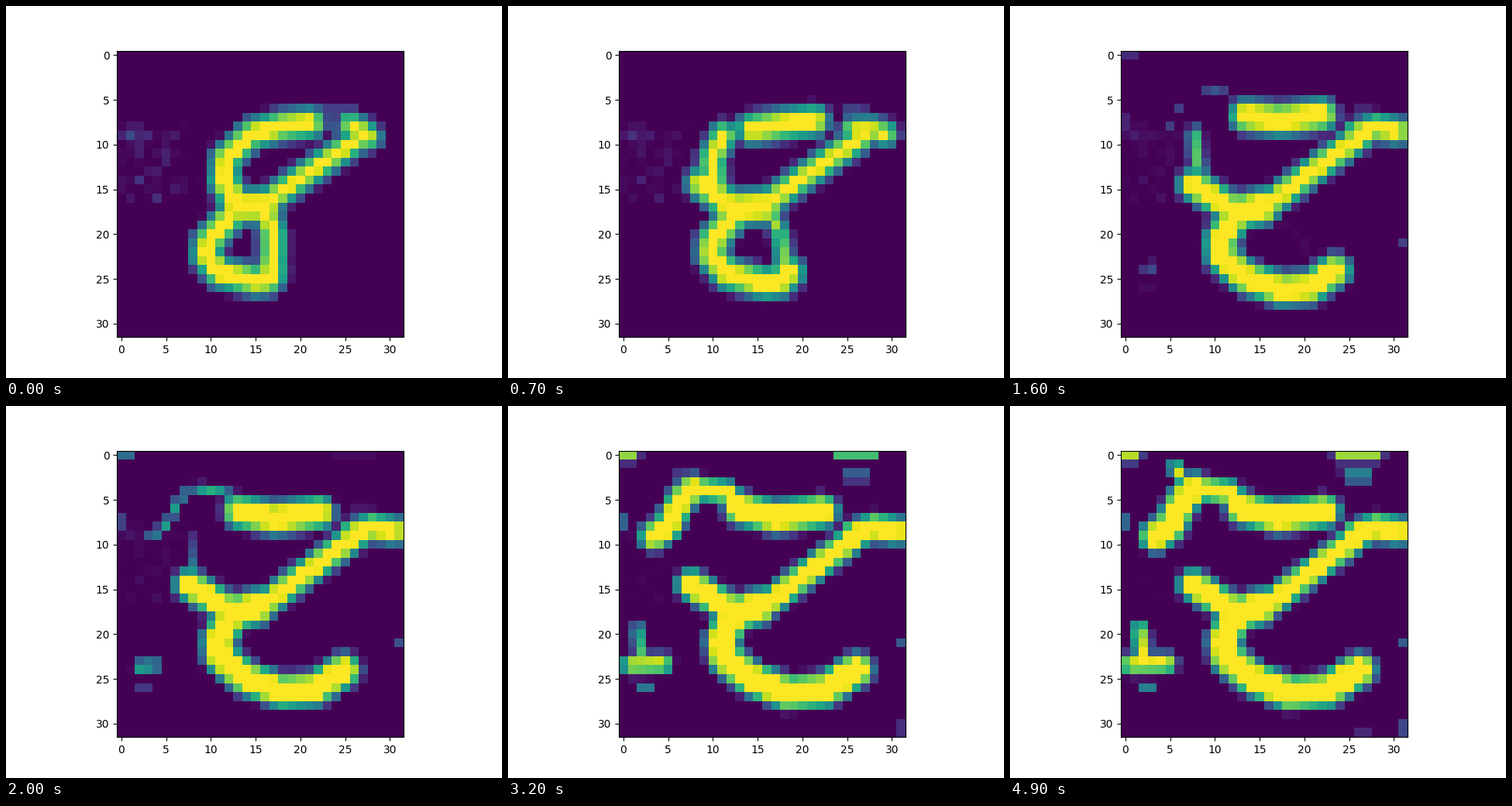
Animation, 640 px wide and 480 px high, one loop 5 s. Source, as a matplotlib script:

```python
import numpy as np
import matplotlib.pyplot as plt
from matplotlib.animation import FuncAnimation

SIZE = 32
FRAMES = 50
INTERVAL = 100
HIDDEN = -1.2  # radius at which a stroke leaves no trace

rows, cols = np.mgrid[0:SIZE, 0:SIZE].astype(float)
strokes = []


def ease(frame, centre, pace=4.2):
    """S-curve from 0 to 1 that is half way at the centre frame."""
    return 1 / (1 + np.exp((centre - frame) / pace))


def stroke(start, end, radii, move=12, grow=12):
    """A line bending from start to end while its radius changes."""
    strokes.append((np.array(start, float), np.array(end, float), radii, move, grow))


def appear(points, radius, grow):
    """A line that stays in place and swells into view."""
    stroke(points, points, (HIDDEN, radius), grow=grow)


# Top bar, left arc of the upper loop, lower arm of that arc
stroke([(21, 7.7), (18, 8), (14.8, 9)],
       [(22.2, 6.3), (17, 7), (13, 6)], (1.5, 1.75))
stroke([(14.8, 9.2), (12, 11.6), (11.7, 14.2)],
       [(7.5, 8.8), (7.8, 11.5), (8.4, 14)], (1.5, HIDDEN), move=7, grow=18)
stroke([(11.8, 14), (13, 16.6)], [(7.6, 14.5), (12, 17.3)], (1.55, 1.6), move=5)

# Crossing, diagonal, hook at its top and the faint link back to the bar
stroke([(13, 16.9), (16, 16.9)], [(12.3, 17.8), (15, 17)], (1.8, 1.9))
stroke([(16.5, 16.2), (26.8, 9.2)], [(16.5, 16.3), (26, 9.1)], (1.3, 1.4))
stroke([(25.5, 7.6), (27, 8.6), (27.5, 9.3)],
       [(25.8, 8.9), (28, 8.1), (30.4, 8.5)], (1.1, 1.45), move=6)
stroke([(22, 6.4), (26, 6.4)], [(25.5, 6.3), (27, 6.3)], (-0.2, -0.4), move=5)

# Lower left curve running into the bottom, and the side that dissolves
stroke([(12.2, 18), (9.7, 20.8), (9.4, 22.4), (10.8, 24.3), (15, 25.2), (16, 25), (16.2, 24.4)],
       [(12, 18.5), (11, 20.7), (11.3, 22.6), (14.3, 25), (18.3, 26.6), (22.5, 26.3), (26.1, 24)],
       (1.5, 1.8))
stroke([(16, 17), (16.7, 20), (16.6, 22.5), (16.1, 24.6)],
       [(17, 17.8), (20, 19.5), (22, 22.5), (23, 25.5)], (1.5, HIDDEN), grow=11)

# Upper left stroke, its tip and its link to the bar
appear([(13, 5.8), (11.5, 4.2), (8.5, 3.8)], 1.3, grow=19)
appear([(7.7, 3.8), (6.4, 5.2), (5, 8), (3.4, 9.1)], 1.7, grow=21)
appear([(5.6, 1.4), (6.6, 3)], 0.7, grow=34)

# Cross at the lower left
stroke([(2.7, 23.8), (3.2, 23.6)], [(0.5, 23.4), (4.6, 23.3)],
       (HIDDEN, 1), move=24, grow=16)
appear([(1.6, 19.5), (2, 23)], 0.8, grow=26)
appear([(2, 26), (3, 26)], -0.1, grow=18)

# Marks along the edges
appear([(0, 0), (1, 0)], 0.55, grow=19)
appear([(24, 0), (28, 0)], 0.5, grow=24)
appear([(24.8, 2.4), (27, 2.4)], 0.3, grow=24)
appear([(0, 7), (0, 8)], -0.25, grow=15)
appear([(31, 21), (31, 21)], -0.3, grow=11)
appear([(31, 30), (31, 31)], -0.4, grow=25)
appear([(26, 31), (27, 31)], -0.5, grow=38)

# Faint noise at the left that dies away
rng = np.random.default_rng(4)
noise = 0.35 * rng.random((SIZE, SIZE)) ** 4 * np.clip(1 - cols / 8, 0, 1)
noise[(rows < 8) | (rows > 16)] = 0


def line(a, b, radius, soft):
    """Coverage of every cell by a soft-edged line from a to b."""
    dx, dy = b - a
    length2 = max(dx * dx + dy * dy, 1e-9)
    t = np.clip(((cols - a[0]) * dx + (rows - a[1]) * dy) / length2, 0, 1)
    dist = np.hypot(cols - a[0] - t * dx, rows - a[1] - t * dy)
    return 0.5 + (radius - dist) / soft


def picture(frame):
    field = noise * np.exp(-frame / 15)
    soft = 1.9 - 0.5 * ease(frame, 16)
    for start, end, (thick0, thick1), move, grow in strokes:
        points = start + (end - start) * ease(frame, move, min(4.2, move / 2.5))
        radius = thick0 + (thick1 - thick0) * ease(frame, grow)
        for a, b in zip(points, points[1:]):
            field = np.maximum(field, line(a, b, radius, soft))
    return np.clip(field, 0, 1)


fig, ax = plt.subplots(figsize=(6.4, 4.8), dpi=100)
image = ax.imshow(picture(0), cmap="viridis", vmin=0, vmax=1)


def update(frame):
    image.set_data(picture(frame))
    return (image,)


anim = FuncAnimation(fig, update, frames=FRAMES, interval=INTERVAL, repeat=True)
plt.show()
```
